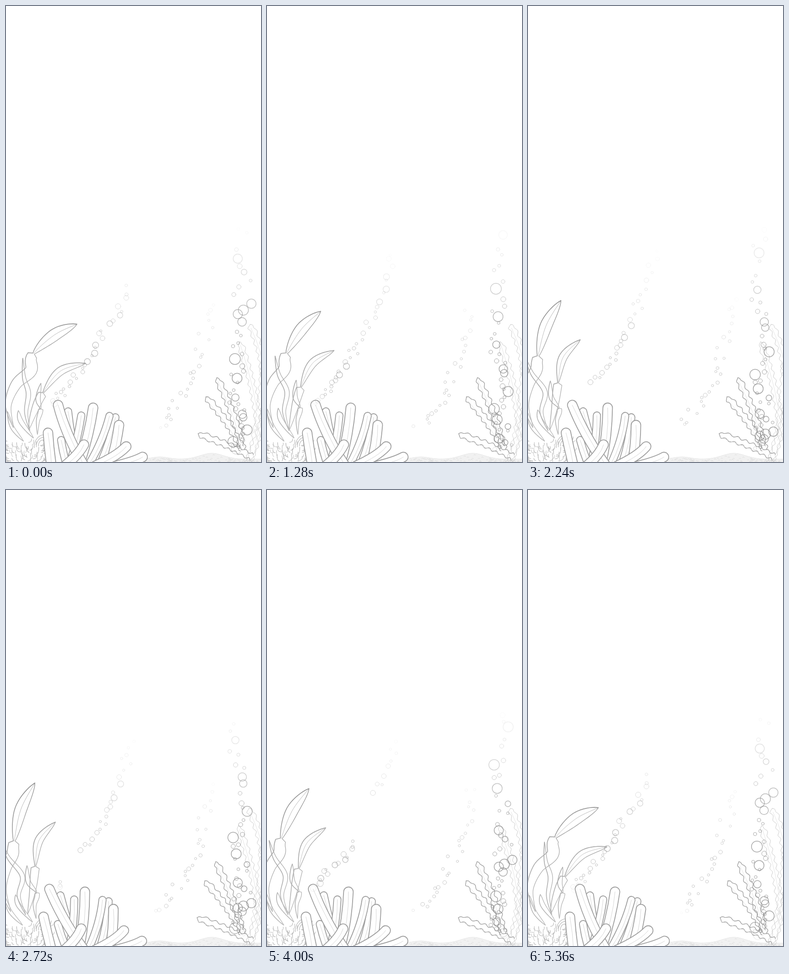
Recreate the animation shown at these times as an HTML page with a canvas. Size 560 by 1001 pixels, loop 5440 ms.

```html
<!DOCTYPE html>
<html lang="en">
<head>
<meta charset="utf-8">
<title>Seabed sketch</title>
<style>
html, body { margin: 0; width: 100%; height: 100%; overflow: hidden; background: #fff; }
canvas { display: block; }
</style>
</head>
<body>
<canvas id="stage" width="560" height="1001"></canvas>
<script>
const LOOP = 5440, STEP = 80, PAPER = '#fff';
const ctx = document.getElementById('stage').getContext('2d');
const clamp = (v, lo, hi) => Math.max(lo, Math.min(hi, v));
const mix = (a, b, f) => a + (b - a) * f;
const grey = (v, a = 1) => `rgba(${v},${v},${v},${a})`;
const points = text => text.split(' ').map(p => p.split(',').map(Number));

function seeded(seed) {
  return () => (seed = (seed * 16807) % 2147483647) / 2147483647;
}

function line(pts, color, width) {
  ctx.beginPath();
  pts.forEach(p => ctx.lineTo(...p));
  ctx.strokeStyle = color;
  ctx.lineWidth = width;
  ctx.stroke();
}

function curve([a, b, c], color, width) {
  ctx.beginPath();
  ctx.moveTo(...a);
  ctx.quadraticCurveTo(...b, ...c);
  ctx.strokeStyle = color;
  ctx.lineWidth = width;
  ctx.stroke();
}

// Point at u (0..1) on a smooth curve through pts
function along(pts, u) {
  const n = pts.length - 1, i = Math.min(n - 1, Math.floor(u * n)), f = u * n - i;
  const at = j => pts[clamp(j, 0, n)];
  return [0, 1].map(k => {
    const a = at(i - 1)[k], b = at(i)[k], c = at(i + 1)[k], d = at(i + 2)[k];
    return b + f * ((c - a) / 2 + f * (a - 2.5 * b + 2 * c - d / 2 + f * (1.5 * (b - c) + (d - a) / 2)));
  });
}

// Both outlines of a band around a spine; offset(u, side) is the distance from it
function edges(spine, offset, n = 60) {
  return [1, -1].map(side => Array.from({ length: n + 1 }, (_, k) => {
    const u = k / n, [x, y] = along(spine, u);
    const [x1, y1] = along(spine, Math.max(0, u - .01)), [x2, y2] = along(spine, Math.min(1, u + .01));
    const d = side * offset(u, side) / Math.hypot(x2 - x1, y2 - y1);
    return [x + (y2 - y1) * d, y - (x2 - x1) * d];
  }));
}

// 0 leans right, 1 leans left
function sway(t) {
  const a = 2 * Math.PI * (t - 210) / LOOP;
  return .515 - .515 * Math.cos(a) + .03 * (Math.sin(a) - Math.cos(2 * a));
}

// Spines in the right and left pose; the ribbon twists over itself at the knee
const kelp = [
  { right: '154,697 104,722 57,767 54,800 22,830 5,876 16,925', left: '63,643 32,702 17,776 14,800 0,830 -6,876 10,925', width: 13, knee: 1 / 3 },
  { right: '173,783 118,801 79,852 60,895 50,930', left: '108,729 72,770 64,830 58,882 48,930', width: 9, knee: 1 / 2 },
  { right: '36,773 39,815 49,850 44,892 52,932', left: '-10,775 6,808 36,848 28,891 43,932', width: 5, knee: 1 },
  { right: '76,828 70,862 76,886 70,911 69,940', left: '46,825 49,860 68,886 63,911 66,940', width: 5, knee: 1 / 2 },
  { right: '27,888 33,912 60,948', left: '21,889 28,912 58,948', width: 5, knee: 1 },
  { right: '3,890 14,925 38,955', left: '-4,890 9,925 36,955', width: 4, knee: 1 }
].map(k => ({ ...k, right: points(k.right), left: points(k.left) }));

const kelpTone = ctx.createLinearGradient(0, 640, 0, 950);
kelpTone.addColorStop(0, grey(140));
kelpTone.addColorStop(.45, grey(168));
kelpTone.addColorStop(1, grey(185));

function drawKelp(s) {
  for (const { right, left, width, knee } of kelp) {
    const last = right.length - 1;
    const spine = right.map(([x, y], i) => {
      const lift = 22 * s * (1 - s) * (1 - i / last);
      return [mix(x, left[i][0], s), mix(y, left[i][1], s) - lift];
    });
    const half = u => width * Math.sin(Math.PI * u / (u < knee ? knee : 1));
    edges(spine, half).forEach((edge, i) => line(edge, kelpTone, i ? 1.7 : 1.3));
    if (width > 8) line(Array.from({ length: 20 }, (_, k) => along(spine, knee * k / 20)), kelpTone, .7);
  }
}

// Finger coral: tip x, tip y, foot x
const backFingers = [[136, 890, 158], [165, 899, 138], [240, 903, 205], [227, 900, 180], [121, 953, 134]];
const frontFingers = [[248, 920, 228], [191, 882, 160], [114, 876, 172], [92, 937, 100], [171, 963, 128], [264, 967, 195], [300, 990, 240]];

function drawFingers(fingers, width, s) {
  for (const [x, y, foot] of fingers) {
    const tip = x - (1001 - y) * .15 * s, bend = mix(x, foot, .3) - (1001 - y) * .07 * s;
    const middle = mix(y, 1010, .5);
    const spine = [[tip, y], [bend, middle], [foot, 1010]];
    curve(spine, grey(158), width + 1.8);
    curve(spine, PAPER, width - 1.8);
    curve([[tip, y], [bend + width * .2, middle], [foot, 1010]], grey(195), .7);
  }
}

// Wavy coral: tip, foot, tone
const branches = [
  [536, 699, 566, 810, 200], [513, 737, 556, 930, 200], [566, 780, 535, 1001, 212], [566, 880, 530, 1005, 200],
  [463, 816, 520, 975, 160], [439, 858, 517, 968, 160], [422, 939, 540, 990, 160]
];

function drawBranches(s) {
  for (const [x, y, fx, fy, tone] of branches) {
    const length = Math.hypot(fx - x, fy - y);
    const spine = [0, .25, .5, .75, 1].map(u =>
      [mix(x - 2.5 * s, fx, u) + 6 * Math.sin(Math.PI * u), mix(y, fy, u)]);
    const half = (u, side) => Math.min(1, u * 14) * (6.5 + 2.3 * Math.sin(u * length * .36 + side));
    for (const edge of edges(spine, half)) line(edge, grey(tone), tone < 180 ? 1.4 : 1);
    line(spine.slice(0, 4).map(([px, py]) => [px + 2, py + 8]), grey(222), .8);
  }
}

function drawFloor() {
  const bump = (x, mid, width) => Math.exp(-(((x - mid) / width) ** 2));
  const ridge = x => 995 - 13 * bump(x, 452, 36) - 5 * bump(x, 338, 26);
  const top = [];
  for (let x = 303; x <= 563; x += 4) top.push([x, ridge(x)]);
  line(top, grey(215), 1);
  ctx.lineTo(563, 1003);
  ctx.lineTo(303, 1003);
  ctx.fillStyle = grey(241);
  ctx.fill();
  const rnd = seeded(41);
  for (let i = 0; i < 80; i++) {
    const x = 315 + rnd() * 240, y = mix(ridge(x) + 3, 1001, rnd());
    line([[x, y], [x + 2, y - 1.5], [x + 4, y]], grey(212), .7);
  }
}

// Tangle of curled fronds with a cap shape on the right
function drawRock() {
  const rnd = seeded(97);
  for (let i = 0; i < 75; i++) {
    const x = rnd() * 92, y = mix(948, 1001, Math.sqrt(rnd()));
    const dx = (x - 46) * .25 + (rnd() - .5) * 14, dy = -4 - rnd() * 9;
    curve([[x, y], [x + dx, y], [x + dx, y + dy]], grey(165 + rnd() * 35), 1.1);
  }
  for (const r of [9, 14, 19]) {
    ctx.beginPath();
    ctx.ellipse(79, 963, r * .85, r * 1.15, .3, 2.6, 7.2);
    ctx.strokeStyle = grey(180);
    ctx.stroke();
  }
}

// Rising columns. Height grows as a(e^(kt) - 1), births fall in [from, from + span]
const columns = [
  { seed: 12, count: 46, x: 516, spread: 30, base: 980, a: 138, k: .00029, life: LOOP, from: 0, span: LOOP,
    drift: 0, small: 3, large: 12, tone: 130, alpha: .7, top: 480, fade: 260 },
  { seed: 7, count: 44, x: 100, spread: 20, base: 880, a: 150, k: .00033, life: 3700, from: 2300, span: 4500,
    drift: 250, small: 2.5, large: 7, tone: 140, alpha: .5, top: 530, fade: 240 },
  { seed: 29, count: 26, x: 330, spread: 18, base: 930, a: 227, k: .00015, life: LOOP, from: 0, span: LOOP,
    drift: 140, small: 2.5, large: 4.5, tone: 140, alpha: .45, top: 630, fade: 170 }
];

function drawBubbles(t) {
  for (const c of columns) {
    const rnd = seeded(c.seed * 7919);
    for (let i = 0; i < c.count; i++) {
      const born = c.from + c.span * (i + rnd()) / c.count;
      const x0 = c.x + c.spread * (rnd() + rnd() - 1);
      const r = mix(c.small, c.large, rnd() ** 2);
      const age = ((t - born) % LOOP + LOOP) % LOOP;
      if (age > c.life) continue;
      const h = c.a * (Math.exp(c.k * age) - 1), y = c.base - h;
      const x = x0 + (c.drift && c.drift * (1 - Math.exp(-h / c.drift)));
      const alpha = c.alpha * clamp((y - c.top) / c.fade, 0, 1) * clamp(age / 500, 0, 1);
      ctx.beginPath();
      ctx.arc(x, y, r, 0, 7);
      ctx.strokeStyle = grey(c.tone, alpha);
      ctx.lineWidth = r > 6 ? 1.5 : 1;
      ctx.stroke();
    }
  }
}

function draw(now) {
  let t = Math.floor(now % LOOP / STEP) * STEP;
  if (t < 2 * STEP) t = 0;
  const s = sway(t);
  ctx.fillStyle = PAPER;
  ctx.fillRect(0, 0, 560, 1001);
  ctx.lineCap = ctx.lineJoin = 'round';
  drawFloor();
  drawKelp(s);
  drawRock();
  drawFingers(backFingers, 16, s);
  drawFingers(frontFingers, 21, s);
  drawBranches(s);
  drawBubbles(t);
}

const start = performance.now();
function tick() {
  draw(performance.now() - start);
  requestAnimationFrame(tick);
}
tick();
</script>
</body>
</html>
```
